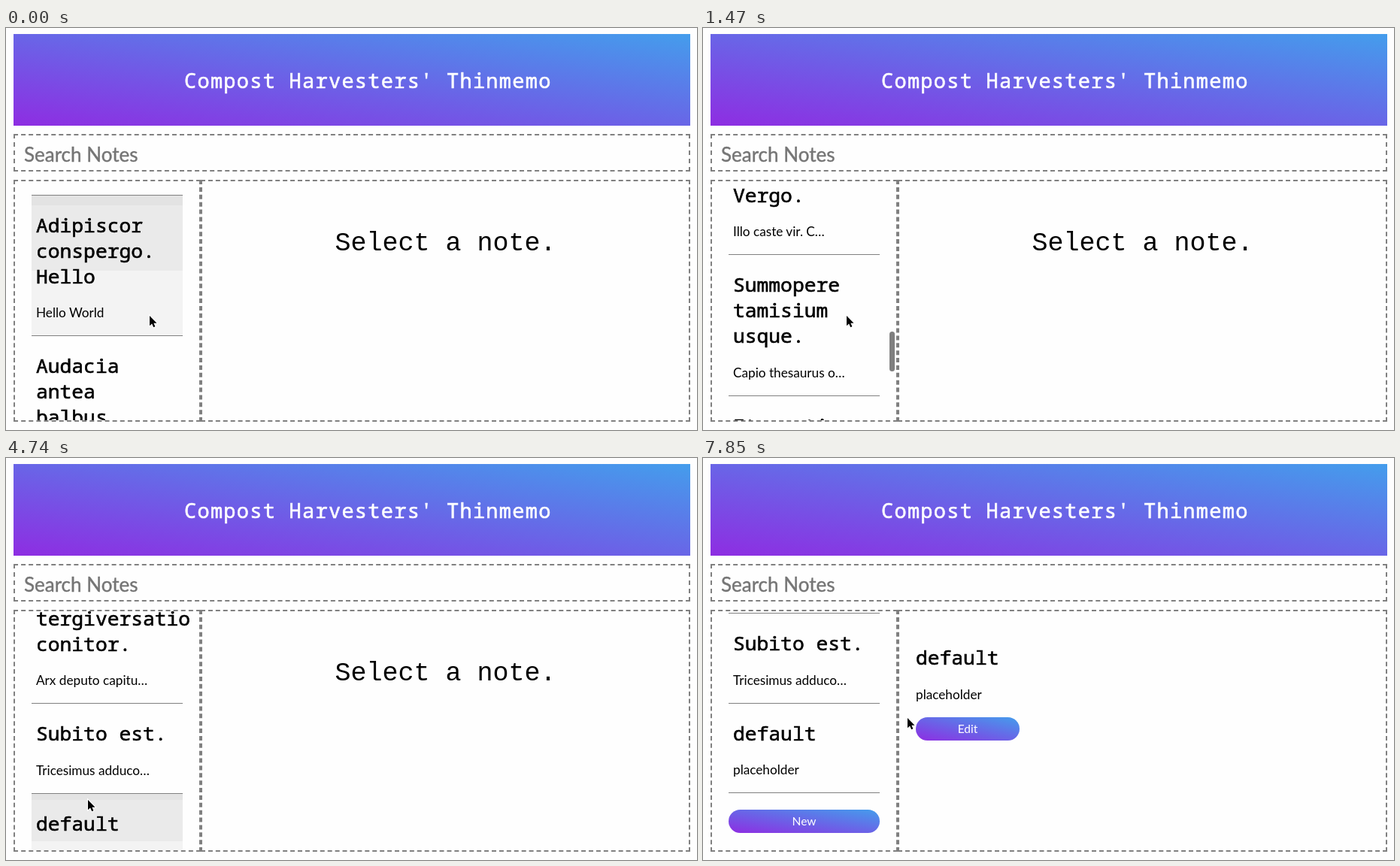
These frames come from a looping animation (919 px wide and 535 px high, 8000 ms). An HTML page:

```html
<!DOCTYPE html>
<html lang="en">
<head>
<meta charset="utf-8">
<title>Notes</title>
<style>
  html, body { margin: 0; width: 100%; height: 100%; overflow: hidden; background: #fefefe; }
  body { position: relative; color: #000; font: 17.2px/20px Lato, sans-serif; }
  body *, body { box-sizing: border-box; }
  header, .box, #list, #thumb, #prompt, #detail, #cursor { position: absolute; }
  header, .button { background: linear-gradient(to top right, #8e2de2, #449dec); color: #fff; }
  header { left: 10px; top: 8px; width: 900px; height: 122px; }
  h1, h2 { margin: 0; font-family: "Noto Sans Mono", monospace; font-weight: 500; white-space: pre; -webkit-text-stroke: .6px; }
  h1 { position: absolute; left: 227px; top: 41.5px; font-size: 27px; line-height: 40px; letter-spacing: 1.25px; }
  h2 { font-size: 26.3px; line-height: 34px; }
  p { margin: 22.5px 0 0; white-space: pre; }
  .box { border: 2px dashed #808080; overflow: hidden; }
  #search { left: 10px; top: 141px; width: 900px; height: 50px; padding: 2px 12px; font-size: 26px; line-height: 46px; color: #757575; -webkit-text-stroke: .4px; }
  #side { left: 10px; top: 202px; width: 249px; height: 322px; }
  #main { left: 259px; top: 202px; width: 651px; height: 322px; }
  #list { left: 22px; width: 201px; padding-top: 17.5px; }
  #notes { border-top: 1px solid #808080; }
  .note { padding: 22px 6px 20px; border-bottom: 1px solid #808080; }
  .note.hover { background: linear-gradient(#e3e3e3 7%, #eaeaea 7% 53.5%, #f3f3f3 53.5%); }
  .button { height: 31px; margin-top: 22px; border-radius: 16px; font-size: 15.5px; line-height: 31px; text-align: center; }
  #thumb { left: 236px; width: 7px; border-radius: 4px; background: #7f7f7f; }
  #prompt { left: 0; right: 0; top: 62.5px; text-align: center; font: 35px/40px "Liberation Mono", monospace; }
  #detail { left: 22px; top: 44px; width: 138px; }
  #detail .button { margin-top: 20.5px; }
  #cursor { left: 0; top: 0; overflow: visible; }
  #arrow { stroke: #fff; stroke-width: 2px; paint-order: stroke; }
</style>
</head>
<body>
<header><h1>Compost Harvesters' Thinmemo</h1></header>
<div class="box" id="search">Search Notes</div>
<div class="box" id="side">
  <div id="list"><div id="notes"></div><div class="button">New</div></div>
  <div id="thumb"></div>
</div>
<div class="box" id="main">
  <div id="prompt">Select a note.</div>
  <div id="detail"><h2>default</h2><p>placeholder</p><div class="button">Edit</div></div>
</div>
<svg id="cursor" width="1" height="1">
  <path id="arrow" d="M0 0V13.2L3.1 10.5 5.2 15.2 7.4 14.3 5.4 9.7H9.5Z"/>
  <path id="beam" d="M-3 -7.5Q0 -7.5 0 -5V5Q0 7.5 -3 7.5M3 -7.5Q0 -7.5 0 -5M3 7.5Q0 7.5 0 5M-2 2H2" fill="none" stroke="#333"/>
</svg>
<script>
const TICK = 148, LOOP = 8000;
const ADDED = 28, OPENED = 49;
const VIEW_TOP = 204, FIRST_NOTE = 18.5;

const notes = [
  ['Adipiscor\nconspergo.\nHello', 'Hello World'],
  ['Audacia\nantea\nbalbus.', 'Vesper tandem u…'],
  ['Curriculum\ndolorem\nsolus.', 'Ademptio vox ar…'],
  ['Voluptas\ncaelum\ntextor.', 'Confugo credo ali…'],
  ['Argentum\nalveus est\ncalco.', 'Crastinus tempus …'],
  ['Error cedo.', 'Demo cursus vil…'],
  ['Vergo.', 'Illo caste vir. C…'],
  ['Summopere\ntamisium\nusque.', 'Capio thesaurus o…'],
  ['Et vesti\ntergiversatio\nconitor.', 'Arx deputo capitu…'],
  ['Subito est.', 'Tricesimus adduco…'],
  ['default', 'placeholder']
];

// Keys are [tick, ...values]
const scrollKeys = [[0, 0], [1, 60], [6, 700.7], [10, 1097], [12, 1446.6], [34, 1446.6], [38, 1566.7]];
const cursorKeys = [
  [15, 191, 383], [22, 126, 455], [26, 95, 469], [30, 95, 469], [32, 109, 455],
  [38, 109, 455], [42, 84, 398], [43, 68, 370], [47, 123, 411], [50, 123, 411], [53, 272, 346]
];

const $ = id => document.getElementById(id);

const items = notes.map(([title, text]) => {
  const note = document.createElement('div');
  note.className = 'note';
  for (const [tag, content] of [['h2', title], ['p', text]]) {
    note.appendChild(document.createElement(tag)).textContent = content;
  }
  return $('notes').appendChild(note);
});
const heights = notes.map(([title]) => 85.5 + 34 * title.split('\n').length);

function at(keys, tick) {
  const next = keys.findIndex(key => key[0] > tick);
  if (next === 0) return keys[0].slice(1);
  if (next < 0) return keys[keys.length - 1].slice(1);
  const a = keys[next - 1], b = keys[next];
  const u = (tick - a[0]) / (b[0] - a[0]);
  return a.slice(1).map((v, i) => v + (b[i + 1] - v) * u);
}

const show = (element, visible) => { element.style.display = visible ? '' : 'none'; };

function draw(tick) {
  const [scroll] = at(scrollKeys, tick);
  const [x, y] = at(cursorKeys, tick);
  const added = tick >= ADDED, opened = tick >= OPENED;
  const scrolling = tick > 0 && scroll !== at(scrollKeys, tick - 1)[0];

  $('list').style.top = -scroll + 'px';
  show(items[items.length - 1], added);
  let top = VIEW_TOP + FIRST_NOTE - scroll;
  items.forEach((item, i) => {
    const shown = added || i < items.length - 1;
    const over = x >= 34 && x < 235 && y >= top && y < top + heights[i];
    item.classList.toggle('hover', shown && over && !scrolling);
    top += heights[i];
  });

  const thumbHeight = added ? 50 : 53;
  const range = added ? 1566.7 : 1446.6;
  $('thumb').style.height = thumbHeight + 'px';
  $('thumb').style.top = 2 + (314 - thumbHeight) * scroll / range + 'px';
  show($('thumb'), (tick >= 1 && !added) || (tick >= 35 && !opened));

  show($('prompt'), !opened);
  show($('detail'), opened);

  const overText = tick >= 43 && tick < 47;
  show($('arrow'), !overText);
  show($('beam'), overText);
  $('cursor').style.transform = `translate(${x}px, ${y}px)`;
}

function frame() {
  draw(Math.floor((performance.now() % LOOP + 10) / TICK));
  requestAnimationFrame(frame);
}
frame();
</script>
</body>
</html>
```
